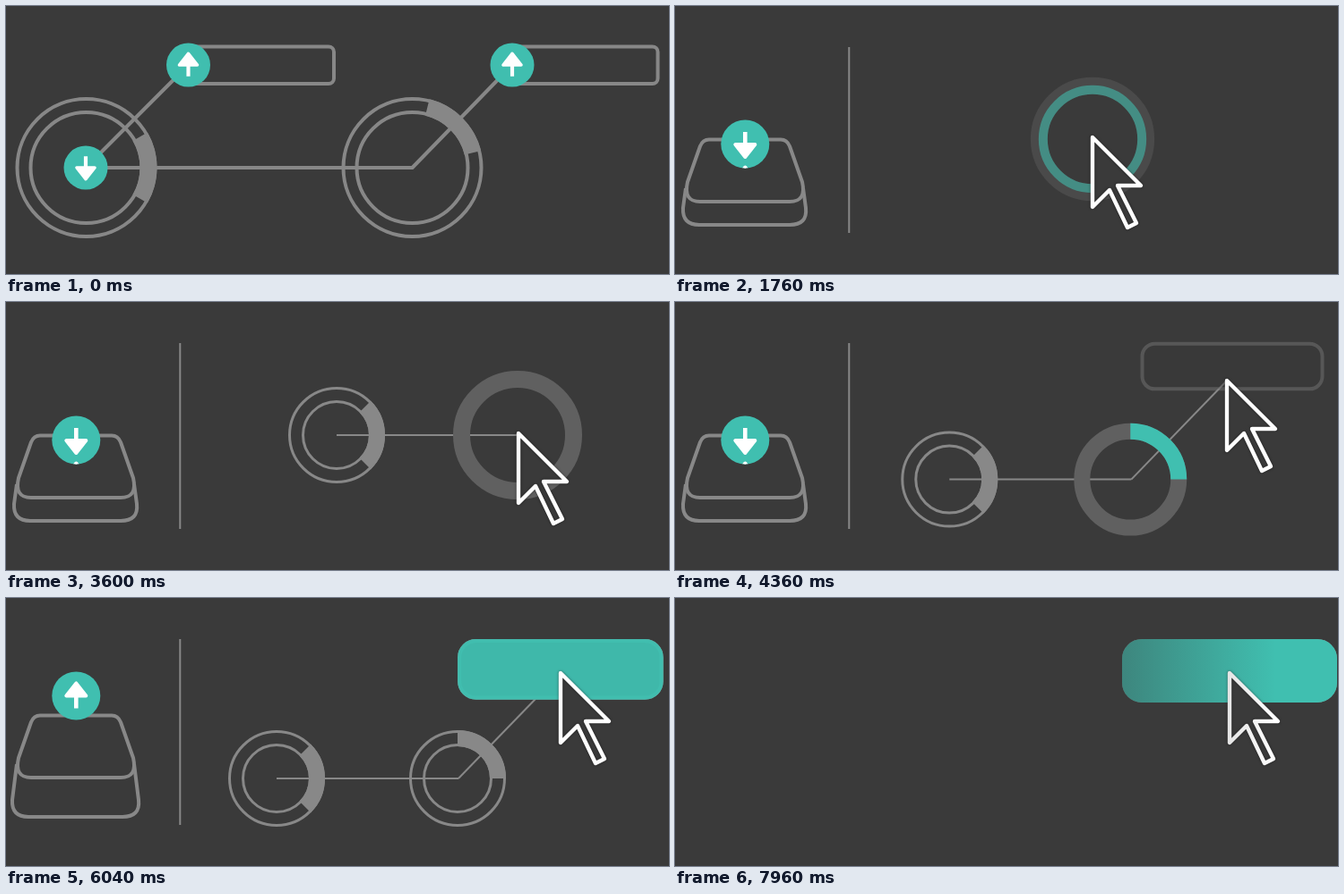
Recreate the animation shown at these times as an HTML page with a canvas. Size 740 by 300 pixels, loop 8000 ms.

```html
<!DOCTYPE html>
<html lang="en">
<head>
<meta charset="utf-8">
<title>Press, drag, release</title>
<style>
  html, body { margin: 0; width: 100%; height: 100%; overflow: hidden; background: #3a3a3a; }
  canvas { display: block; }
</style>
</head>
<body>
<canvas id="stage" width="740" height="300"></canvas>
<script>
const LOOP = 8000;
const BG = '#3a3a3a', GREY = '#888', DIM = '#606060', TEAL = '#40bfb0';
const ctx = document.getElementById('stage').getContext('2d');

// Timing helpers
const prog = (t, a, b) => Math.min(1, Math.max(0, (t - a) / (b - a)));
const mix = (a, b, k) => a + (b - a) * k;
const inOut = (k, n = 3) => k < .5 ? (2 * k) ** n / 2 : 1 - (2 - 2 * k) ** n / 2;
const out = (k, n = 3) => 1 - (1 - k) ** n;
const rad = deg => deg * Math.PI / 180;

// Drawing helpers
function withAlpha(a, draw) {
  if (a <= 0) return;
  ctx.save();
  ctx.globalAlpha *= a;
  draw();
  ctx.restore();
}

function veil(a) {
  withAlpha(a, () => {
    ctx.fillStyle = BG;
    ctx.fillRect(0, 0, 740, 300);
  });
}

function stroke(color, width) {
  ctx.strokeStyle = color;
  ctx.lineWidth = width;
  ctx.stroke();
}

function poly(points, color, width) {
  ctx.beginPath();
  points.forEach(([x, y]) => ctx.lineTo(x, y));
  stroke(color, width);
}

function arc(x, y, outer, inner, color, from = 0, to = 360) {
  ctx.beginPath();
  ctx.arc(x, y, (outer + inner) / 2, rad(from), rad(to));
  stroke(color, outer - inner);
}

function box(x, y, w, h, r) {
  ctx.beginPath();
  ctx.roundRect(x, y, w, h, r);
}

function outlineRing(x, y, outer, inner, line, from, to) {
  arc(x, y, outer, outer - line, GREY);
  arc(x, y, inner + line, inner, GREY);
  arc(x, y, outer, inner, GREY, from, to);
}

function solidRing(x, y, outer, inner, from, to, teal) {
  arc(x, y, outer, inner, DIM);
  withAlpha(teal, () => arc(x, y, outer, inner, TEAL, from, to));
}

// A ring that swells out of the pointer, with a fading teal rim
function popRing(x, y, size, k) {
  const r = mix(30, size, out(k));
  withAlpha(k, () => arc(x, y, r, r - 19, DIM));
  withAlpha(Math.min(1, 8 * k) * (1 - k), () => arc(x, y, r - 9, r - 19, TEAL));
}

function arrow(dir, shift) {
  ctx.save();
  ctx.translate(0, shift);
  ctx.scale(1, dir);
  ctx.strokeStyle = ctx.fillStyle = '#fff';
  ctx.lineWidth = 4.6;
  ctx.beginPath();
  ctx.moveTo(0, -14);
  ctx.lineTo(0, 2);
  ctx.stroke();
  ctx.lineWidth = 4;
  ctx.beginPath();
  ctx.moveTo(-11, 0);
  ctx.lineTo(11, 0);
  ctx.lineTo(0, 14);
  ctx.closePath();
  ctx.fill();
  ctx.stroke();
  ctx.restore();
}

function badge(x, y, r, arrows) {
  ctx.save();
  ctx.translate(x, y);
  ctx.scale(r / 27, r / 27);
  ctx.beginPath();
  ctx.arc(0, 0, 27, 0, 7);
  ctx.fillStyle = TEAL;
  ctx.fill();
  ctx.clip();
  arrows.forEach(([dir, shift]) => arrow(dir, shift));
  ctx.restore();
}

function keycap(press) {
  const d = 18 * press, l = 7 + 2 * press, r = 148 - 2 * press;
  stroke2d(`M12 ${186 + d}L${l} 226Q${l - 1} 245 ${l + 18} 245H${r - 18}Q${r + 2} 245 ${r} 226L143 ${186 + d}`);
  ctx.save();
  ctx.translate(0, d);
  stroke2d('M38 131.5H118Q125 131.5 128 139L142 179Q147 201 128 201H28Q9 201 14 179L28 139Q31 131.5 38 131.5Z');
  ctx.restore();
}

function stroke2d(d) {
  ctx.strokeStyle = GREY;
  ctx.lineWidth = 4;
  ctx.stroke(new Path2D(d));
}

function pointer(x, y) {
  ctx.save();
  ctx.translate(x, y);
  ctx.beginPath();
  [[0, 0], [54, 54], [28, 54], [49, 96], [39, 101], [19, 59], [0, 78]].forEach(p => ctx.lineTo(...p));
  ctx.closePath();
  ctx.fillStyle = BG;
  ctx.fill();
  ctx.shadowColor = 'rgba(0,0,0,.5)';
  ctx.shadowBlur = 3;
  stroke('#fff', 4.4);
  ctx.restore();
}

// Scenes
function diagram(t) {
  [204, 565.5].forEach(x => {
    box(x, 45.5, 162, 41.5, 6);
    stroke(GREY, 4);
  });
  poly([[203.5, 66], [89, 181], [453.5, 181], [565, 66]], GREY, 4);
  outlineRing(89.5, 181, 79, 60, 4, -30, 30);
  outlineRing(453.5, 181, 79, 60, 4, -76, -14);
  badge(89, 181, 24.5, [[1, 0]]);
  badge(203.5, 66, 24.5, [[-1, 0]]);
  badge(565, 66, 24.5, [[-1, 0]]);
  veil(t / 240);
}

function keyPanel(t) {
  const drop = mix(65, 93, out(prog(t, 400, 1200)));
  const pushed = mix(drop, 154.5, inOut(prog(t, 1240, 1640)));
  const y = mix(pushed, 93, out(prog(t, 5600, 6840)));
  keycap(prog(y, 136.5, 154.5));
  poly([[194.3, 46], [194.3, 254]], GREY, 2);
  veil(1 - prog(t, 400, 900));
  const alpha = prog(t, 400, 900) * (1 - prog(t, 6100, 6860));
  const leave = 42 * inOut(prog(t, 5160, 5400));
  const enter = 40 * (1 - out(prog(t, 5320, 5700), 2));
  withAlpha(alpha, () => badge(78.3, y, 27, [[1, .5 + leave], [-1, enter]]));
}

function pointerAt(t) {
  const up = inOut(prog(t, 3800, 4600), 4);
  return [
    mix(mix(466, 572, inOut(prog(t, 2560, 3200))), 619, up),
    mix(mix(310, 147, out(prog(t, 400, 1200))), 84, up)
  ];
}

function dials(t, tip) {
  const settle = inOut(prog(t, 3800, 4600), 4);
  const y = mix(149, 202, settle);
  const left = mix(mix(466, 369, inOut(prog(t, 2400, 3200))), 302, settle);
  const right = mix(571, 504, settle);

  if (t > 2400) {
    const end = mix(466, 571, inOut(prog(t, 2596, 3236)));
    poly([[left, y], [t < 3800 ? end : right + 1, y]], GREY, 2);
  }
  if (t > 3800) poly([[right + 1, y], tip], GREY, 2);

  if (t < 2400) {
    popRing(left, y, 78.5, prog(t, 1440, 2200));
  } else {
    const k = inOut(prog(t, 3240, 3600));
    const r = mix(78.5, 54, k), inner = mix(59, 36, k);
    withAlpha(1 - k, () => solidRing(left, y, r, inner, -45, 45, prog(t, 2400, 2700)));
    withAlpha(k, () => outlineRing(left, y, r, inner, 3, -45, 45));
  }

  if (t < 3800) {
    popRing(right, y, 72, prog(t, 3240, 3600));
  } else {
    const r = mix(72, 54, inOut(prog(t, 3920, 4800)));
    const done = prog(t, 5640, 5960);
    withAlpha(1 - done, () => solidRing(right, y, r, r - 18, -90, 0, prog(t, 3800, 4100)));
    withAlpha(done, () => outlineRing(right, y, r, r - 18, 3, -90, 0));
  }
}

function button(t) {
  const k = out(prog(t, 4360, 4800), 2), grow = out(prog(t, 5600, 6500), 2);
  const frame = [[521.5, 520.5, 501], [46.8, 48, 48], [201, 196, 236], [50.5, 54.5, 67]];
  const rect = frame.map(([a, b, c]) => mix(mix(a, b, k), c, grow));
  withAlpha(prog(t, 4240, 4560), () => {
    box(...rect, mix(14, 20, grow));
    ctx.fillStyle = BG;
    ctx.fill();
    stroke(GREY, 4);
    withAlpha(prog(t, 5620, 6060), () => {
      ctx.fillStyle = TEAL;
      ctx.fill();
      stroke(TEAL, 4);
    });
  });
}

// Soft edge sweeping left to right
function wipe(t) {
  if (t < 7320) return;
  const x = mix(-400, 270, prog(t, 7320, 7960));
  const g = ctx.createLinearGradient(x, 0, x + 400, 0);
  g.addColorStop(0, BG);
  g.addColorStop(1, 'rgba(58,58,58,0)');
  ctx.fillStyle = g;
  ctx.fillRect(0, 0, 740, 300);
}

function draw(t) {
  ctx.lineJoin = ctx.lineCap = 'butt';
  ctx.lineJoin = 'round';
  ctx.fillStyle = BG;
  ctx.fillRect(0, 0, 740, 300);
  if (t < 240) return diagram(t);
  if (t < 400) return;
  const tip = pointerAt(t);
  keyPanel(t);
  dials(t, tip);
  veil(prog(t, 7320, 7840));
  button(t);
  pointer(...tip);
  wipe(t);
}

const start = performance.now();
function tick() {
  draw((performance.now() - start) % LOOP);
  requestAnimationFrame(tick);
}
tick();
</script>
</body>
</html>
```
